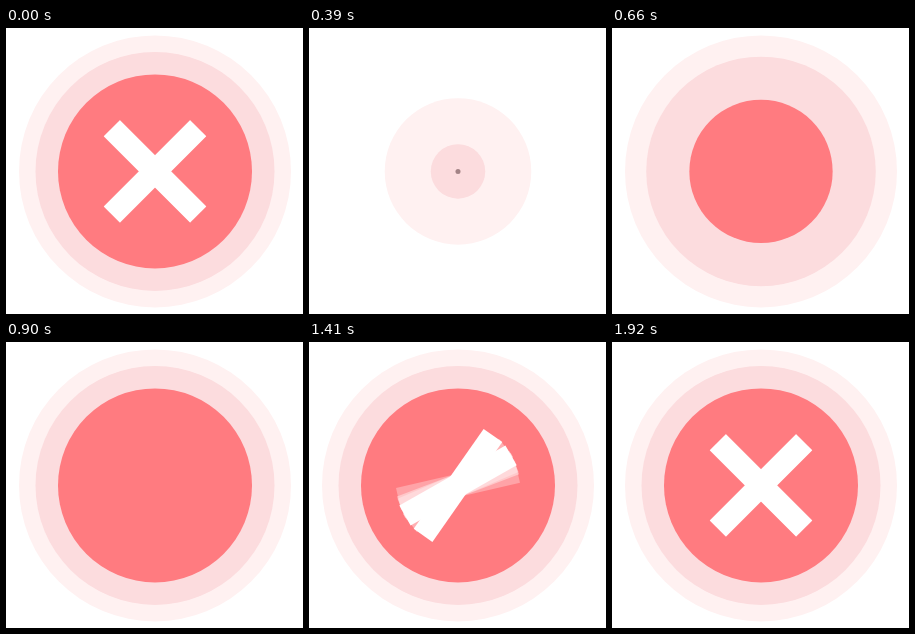
Recreate the animation shown at these times as an HTML page with a canvas. Size 297 by 286 pixels, loop 2250 ms.

```html
<!DOCTYPE html>
<html lang="en">
<head>
<meta charset="utf-8">
<title>Error badge</title>
<style>
  html, body { margin: 0; width: 100%; height: 100%; overflow: hidden; background: #fff; }
  canvas { display: block; }
</style>
</head>
<body>
<canvas id="stage" width="297" height="286"></canvas>
<script>
const ctx = document.getElementById('stage').getContext('2d');
const LOOP = 2250, CLEAR = 120, SETTLED = 1920;
const CX = 149, CY = 143.4;
const BAR = { length: 122, width: 22.8, start: 900, end: 1240 };

const discs = [
  { radius: 136, color: '#fff1f1', start: 136 },
  { radius: 119.5, color: '#fcdcde', start: 237 },
  { radius: 97, color: '#ff7b80', start: 341 }
];
const DISC_TIME = 486;

// Each arm swings past its rest angle at `peak`, then eases back.
const arms = [
  { over: -55, rest: -45, peak: 1530 },
  { over: -145, rest: -135, peak: 1590 }
];
const SWING_START = 1280, SWING_END = 1890;
const echoes = [{ delay: 50, alpha: 0.3 }, { delay: 25, alpha: 0.4 }, { delay: 0, alpha: 1 }];

function ease(t, start, end) {
  const p = Math.min(1, Math.max(0, (t - start) / (end - start)));
  return (1 - Math.cos(Math.PI * p)) / 2;
}

function disc({ radius, color, start }, t) {
  const r = radius * ease(t, start, start + DISC_TIME);
  ctx.fillStyle = r < 3 && radius < 100 ? '#a38386' : color;
  ctx.beginPath();
  ctx.arc(CX, CY, r, 0, 2 * Math.PI);
  ctx.fill();
}

function angleAt({ over, rest, peak }, t) {
  return over * ease(t, SWING_START, peak) + (rest - over) * ease(t, peak, SWING_END);
}

function bar(length, degrees, alpha) {
  ctx.save();
  ctx.globalAlpha = alpha;
  ctx.translate(CX, CY);
  ctx.rotate(degrees * Math.PI / 180);
  ctx.fillStyle = '#fff';
  ctx.fillRect(-length / 2, -BAR.width / 2, length, BAR.width);
  ctx.restore();
}

function draw(t) {
  if (t < CLEAR) t = SETTLED;
  ctx.clearRect(0, 0, 297, 286);
  discs.forEach(d => disc(d, t));
  const length = BAR.length * ease(t, BAR.start, BAR.end);
  if (!length) return;
  for (const { delay, alpha } of echoes)
    for (const arm of arms) bar(length, angleAt(arm, t - delay), alpha);
}

function tick(now) {
  draw(now % LOOP);
  requestAnimationFrame(tick);
}
requestAnimationFrame(tick);
</script>
</body>
</html>
```
